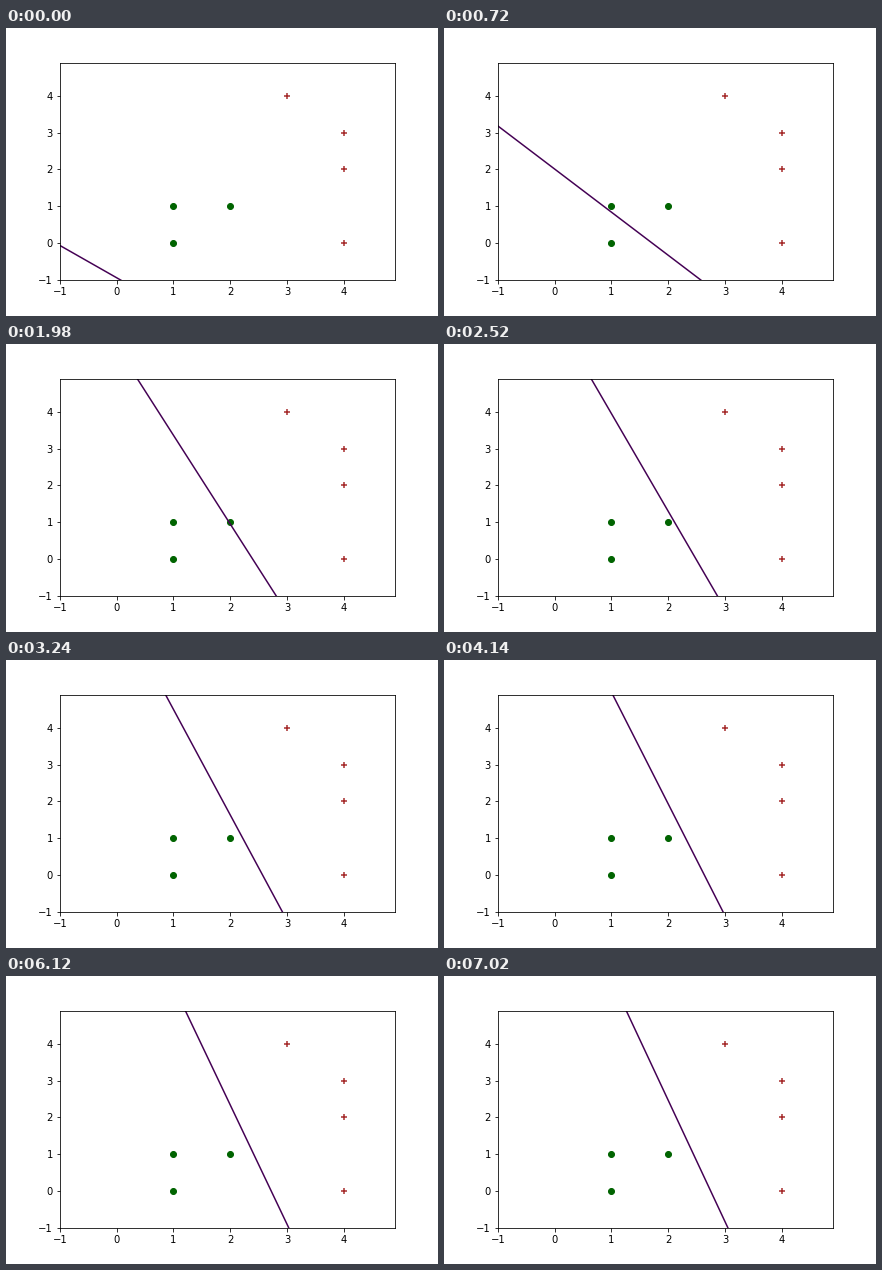
A matplotlib script for the animation above (7200 ms loop, 432 by 288 pixels).

```python
import numpy as np
import matplotlib.pyplot as plt
from matplotlib.animation import FuncAnimation

FRAMES, INTERVAL = 40, 180
RATE, STEPS = 0.06, 5
LOW, HIGH = -1, 4.9

dots = np.array([(1, 0), (1, 1), (2, 1)])
pluses = np.array([(3, 4), (4, 3), (4, 2), (4, 0)])


def train():
    """Logistic regression by gradient ascent; weights kept every STEPS updates."""
    points = np.vstack([dots, pluses])
    X = np.column_stack([np.ones(len(points)), points])
    y = np.repeat([0, 1], [len(dots), len(pluses)])
    w = np.ones(3)
    history = []
    for step in range(FRAMES * STEPS):
        w = w + RATE * X.T @ (y - 1 / (1 + np.exp(-X @ w)))
        if step % STEPS == 0:
            history.append(w)
    return history


weights = train()

fig, ax = plt.subplots(figsize=(6, 4), dpi=72)
fig.subplots_adjust(left=0.125, right=0.9, bottom=0.125, top=0.88)
ax.set(xlim=(LOW, HIGH), ylim=(LOW, HIGH),
       xticks=range(-1, 5), yticks=range(-1, 5))
ax.scatter(*dots.T, color="darkgreen", marker="o")
ax.scatter(*pluses.T, color="brown", marker="+")
boundary, = ax.plot([], [], color="#440154", lw=1.5)

ends = np.array([LOW - 1, HIGH + 1])


def update(i):
    b, w1, w2 = weights[i]
    boundary.set_data(-(b + w2 * ends) / w1, ends)
    return boundary,


anim = FuncAnimation(fig, update, frames=FRAMES, interval=INTERVAL,
                     repeat=True, repeat_delay=0)
plt.show()
```
